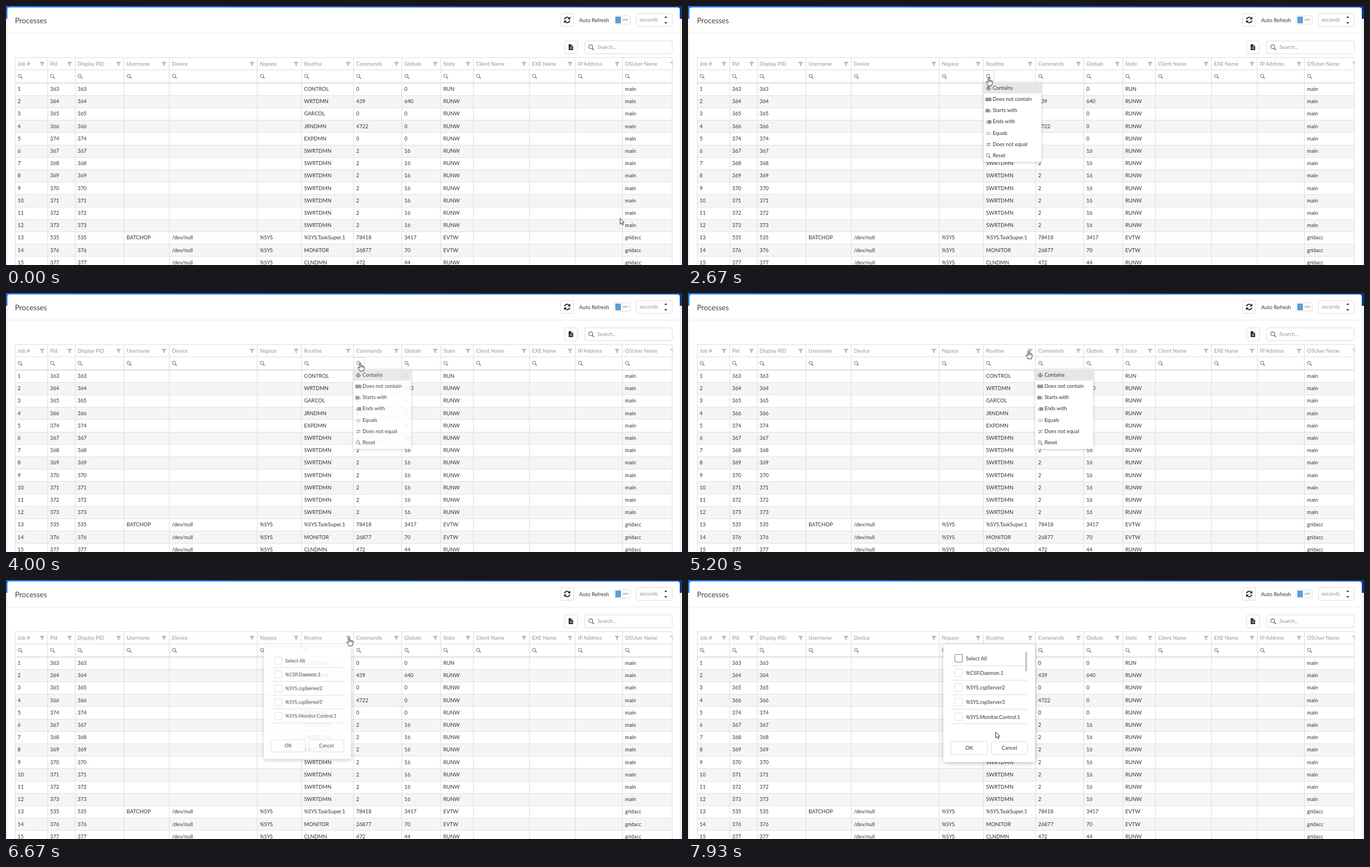
These frames come from a looping animation (1207 px wide and 464 px high, 8 s). An HTML page:

```html
<!DOCTYPE html>
<html lang="en">
<head>
<meta charset="utf-8">
<title>Processes</title>
<style>
  html, body { margin: 0; width: 100%; height: 100%; overflow: hidden; background: #fff; }
  svg { display: block; width: 1207px; height: 464px; }
  text { font: 9.333px Lato, sans-serif; fill: #333; white-space: pre; }
  .title { font-size: 13.2px; fill: #444; }
  .item { font-size: 9.2px; }
  .off { font-size: 5.4px; font-weight: 700; fill: #999; }
  .head { fill: #959595; }
  .mid { text-anchor: middle; }
  .line { stroke: #ddd; fill: none; }
  .box { stroke: #ddd; fill: #fff; }
  .menu { filter: drop-shadow(0 1px 2px rgba(0, 0, 0, .25)); }
  .popup { filter: drop-shadow(0 2px 4px rgba(0, 0, 0, .25)); transform-origin: 538px 220.5px; }

  .smooth { animation: 8s linear infinite; }
  .step { animation: 8s step-end infinite; }
  #menu1 { animation-name: menu1; }
  #menu2 { animation-name: menu2; }
  #hover1 { animation-name: hover1; }
  #hover2 { animation-name: hover2; }
  #popup { animation-name: pop; }
  #focus { animation-name: focus; }
  #bar { animation-name: bar; }
  #cursor { animation-name: move; }
  #arrow { animation-name: arrow; }
  #beam { animation-name: beam; }
  #hand { animation-name: hand; }

  @keyframes menu1 { 0%, 31.4% { opacity: 0 } 32.65%, 38.8% { opacity: 1 } 40.05%, 100% { opacity: 0 } }
  @keyframes menu2 { 0%, 48.9% { opacity: 0 } 50.15%, 66.6% { opacity: 1 } 67.85%, 100% { opacity: 0 } }
  @keyframes hover1 { 0% { opacity: 0 } 29.2% { opacity: 1 } 35.6%, 100% { opacity: 0 } }
  @keyframes hover2 { 0% { opacity: 0 } 47.2% { opacity: 1 } 60.8%, 100% { opacity: 0 } }
  @keyframes pop {
    0% { opacity: 0; transform: scale(.55) }
    81.12% { opacity: 0; transform: scale(.55); animation-timing-function: cubic-bezier(.25, .1, .25, 1) }
    84.87%, 100% { opacity: 1; transform: none }
  }
  @keyframes focus { 0% { opacity: 0 } 84.9%, 100% { opacity: 1 } }
  @keyframes bar { 0% { opacity: 0 } 89.5%, 100% { opacity: 1 } }

  @keyframes move {
    0%, .4% { transform: translate(1096px, 380px); animation-timing-function: ease-in-out }
    4.1%, 7.1% { transform: translate(670.5px, 130px) }
    11% { transform: translate(535px, 123px) }
    13.75% { transform: translate(515px, 110px) }
    15.6% { transform: translate(532px, 108px) }
    16.63% { transform: translate(550px, 107px) }
    17.5% { transform: translate(579px, 106px) }
    19% { transform: translate(616px, 104px) }
    21.6%, 22.6% { transform: translate(612px, 103px) }
    26.25% { transform: translate(580px, 113px) }
    29.4% { transform: translate(540px, 126px) }
    32%, 34.4% { transform: translate(537px, 128px) }
    37% { transform: translate(570px, 130px) }
    40% { transform: translate(658px, 130px) }
    45%, 46.2% { transform: translate(646px, 129px) }
    47.9%, 59.2% { transform: translate(633px, 125px) }
    61.3% { transform: translate(625px, 118px) }
    65% { transform: translate(608px, 103px) }
    68.7% { transform: translate(572px, 111px) }
    70%, 70.5% { transform: translate(575px, 124px) }
    73% { transform: translate(584px, 113px) }
    76.6%, 85.6% { transform: translate(613px, 103px) }
    88.8% { transform: translate(602px, 124px) }
    91.6%, 92% { transform: translate(583px, 146px) }
    94.5% { transform: translate(520px, 185px) }
    96.3% { transform: translate(481px, 225px) }
    99.1%, 100% { transform: translate(549px, 272px) }
  }
  @keyframes arrow { 0% { opacity: 1 } 3.6% { opacity: 0 } 98.5%, 100% { opacity: 1 } }
  @keyframes beam {
    0% { opacity: 0 } 3.6% { opacity: 1 } 10.7% { opacity: 0 }
    26.7% { opacity: 1 } 29% { opacity: 0 } 35.6% { opacity: 1 } 47.2% { opacity: 0 }
    69.2% { opacity: 1 } 72.5%, 100% { opacity: 0 }
  }
  @keyframes hand {
    0% { opacity: 0 } 10.7% { opacity: 1 } 26.7% { opacity: 0 } 29% { opacity: 1 }
    35.6% { opacity: 0 } 47.2% { opacity: 1 } 69.2% { opacity: 0 } 72.5% { opacity: 1 } 98.5%, 100% { opacity: 0 }
  }
</style>
</head>
<body>
<svg viewBox="0 0 1207 464">
  <defs>
    <linearGradient id="blue"><stop stop-color="#1a73e0"/><stop offset="1" stop-color="#0b3c8c"/></linearGradient>
    <clipPath id="grid"><rect x="15" y="92" width="1175.5" height="372"/></clipPath>
    <g id="funnel"><path d="M-4.5-4H4.5L1.3 0V4.2L-1.3 2.6V0Z" fill="#bbb"/></g>
    <g id="lens" fill="none" stroke="#707070">
      <circle cx="-.8" cy="-.8" r="2.9"/><path d="M1.4 1.4L4 4" stroke-width="1.4"/>
    </g>
  </defs>

  <rect width="1207" height="464" fill="#f1f1f1"/>
  <rect width="1207" height="23" fill="url(#blue)"/>
  <path d="M2.5 464V6.5a4 4 0 0 1 4-4H1199a4 4 0 0 1 4 4V464Z" fill="#fff"/>
  <path d="M3 48.5H1203" stroke="#e8e8e8"/>
  <text class="title" x="16" y="31">Processes</text>

  <rect class="box" x="990.5" y="13.5" width="23" height="23" rx="2.5"/>
  <g transform="translate(1002 25)" fill="none" stroke="#222" stroke-width="1.7">
    <path d="M-4.7-1A4.8 4.8 0 0 1 3.6-3.2M4.7 1A4.8 4.8 0 0 1-3.6 3.2"/>
    <path d="M5.6-5.8V-.9H.7ZM-5.6 5.8V.9H-.7Z" fill="#222" stroke="none"/>
  </g>
  <text x="1023.3" y="28.7">Auto Refresh</text>
  <rect class="box" x="1086.5" y="17.5" width="28" height="15" rx="2"/>
  <rect x="1088" y="19" width="10" height="12" rx="1" fill="#5c9fd6"/>
  <text class="off" x="1100.6" y="27.2">OFF</text>
  <rect class="box" x="1125.5" y="13.5" width="64" height="23" rx="2.5"/>
  <text class="head" x="1131" y="28.3">seconds</text>
  <path d="M1175.3 21.3H1180.7L1178 18.2ZM1175.3 29H1180.7L1178 32.1Z" fill="#333"/>

  <rect class="box" x="997.5" y="62.5" width="23" height="23" rx="2.5"/>
  <path d="M1004.7 68.5H1009.6L1012.5 71.4V79H1004.7Z" fill="#222"/>
  <path d="M1009.6 68.5V71.4H1012.5M1007 73.2L1010.4 77.4M1010.4 73.2L1007 77.4" stroke="#fff" fill="none"/>
  <rect class="box" x="1033.5" y="62.5" width="156" height="23" rx="2.5"/>
  <use href="#lens" transform="translate(1045 74) scale(1.2)"/>
  <text class="head" x="1056" y="77.3">Search...</text>

  <g id="table" clip-path="url(#grid)"></g>
  <rect id="hover1" class="step line" x="527.5" y="115.5" width="19" height="21"/>
  <rect id="hover2" class="step line" x="620.5" y="115.5" width="19" height="21"/>
  <g id="menu1" class="smooth menu"></g>
  <g id="menu2" class="smooth menu"></g>
  <g id="popup" class="smooth popup">
    <rect x="456" y="115" width="164" height="211" rx="4" fill="#fff"/>
    <g id="list"></g>
    <rect id="focus" class="step" x="476.5" y="133.5" width="13.5" height="13.5" rx="1" fill="none" stroke="#4f93c9"/>
    <rect id="bar" class="step" x="602.3" y="129" width="3" height="34.5" rx="1" fill="#bfbfbf"/>
    <rect class="box" x="469.5" y="289.5" width="65" height="23" rx="2.5"/>
    <rect class="box" x="541.5" y="289.5" width="65" height="23" rx="2.5"/>
    <text class="mid" x="502" y="304.3">OK</text>
    <text class="mid" x="573.7" y="304.3">Cancel</text>
  </g>

  <g id="cursor" class="smooth">
    <g id="arrow" class="step"><path d="M.5.5V11L3 8.7 4.6 12.3 6.3 11.5 4.7 8H8Z" fill="#fff" stroke="#222" stroke-width=".9"/></g>
    <g id="beam" class="step"><path d="M-2.3-7.5H-.6L0-7 .6-7.5H2.3M0-7V7M-2.3 7.5H-.6L0 7 .6 7.5H2.3" fill="none" stroke="#222"/></g>
    <g id="hand" class="step">
      <path d="M-1.3 9.6V1.4Q-1.2.4-.2.4T.9 1.4V5.4Q2 4.6 2.8 5.6 4.3 4.8 4.7 6.2 6.6 5.6 6.6 7.4V10.8L5.3 13V15H-1.2V13.4L-4.6 9.4Q-5 7.7-3.2 7.8Z" fill="#fff" stroke="#222" stroke-width=".9" stroke-linejoin="round"/>
      <path d="M.9 5.4V8.4M2.8 5.8V8.6M4.7 6.4V8.8" stroke="#222" stroke-width=".7"/>
    </g>
  </g>
</svg>
<script>
  const $ = id => document.getElementById(id);
  const text = (x, y, s, cls = '') => `<text class="${cls}" x="${x}" y="${y}">${s}</text>`;
  const use = (id, x, y) => `<use href="#${id}" x="${x}" y="${y}"/>`;
  const rule = d => `<path class="line" d="${d}"/>`;

  const edges = [16, 74, 123, 210.5, 291.5, 448.5, 527.5, 620.5, 706.5, 776, 834.5, 934.5, 1016.5, 1100.5, 1200];
  const heads = ['Job #', 'Pid', 'Display PID', 'Username', 'Device', 'Nspace', 'Routine', 'Commands',
    'Globals', 'State', 'Client Name', 'EXE Name', 'IP Address', 'OSUser Name'];
  const [top0, pitch] = [137.5, 22.2];

  // pid, routine, commands, globals, state, user, device, namespace
  const rows = [
    '363,CONTROL,0,0,RUN', '364,WRTDMN,439,640,RUNW', '365,GARCOL,0,0,RUNW',
    '366,JRNDMN,4722,0,RUNW', '374,EXPDMN,0,0,RUNW',
    ...Array.from({ length: 7 }, (_, i) => `${367 + i},SWRTDMN,2,16,RUNW`),
    '535,%SYS.TaskSuper.1,78418,3417,EVTW,BATCHOP,/dev/null,%SYS',
    '376,MONITOR,26877,70,EVTW,,/dev/null,%SYS',
    '377,CLNDMN,472,44,RUNW,,/dev/null,%SYS'
  ].map(r => r.split(','));

  function drawTable() {
    let out = '';
    rows.forEach(([pid, routine, cmds, globals, state, user = '', dev = '', ns = ''], i) => {
      const y = top0 + i * pitch;
      const owner = dev ? 'gridacc' : 'main';
      const cells = [i + 1, pid, pid, user, dev, ns, routine, cmds, globals, state, '', '', '', owner];
      if (i % 2) out += `<rect x="16" y="${y}" width="1174" height="${pitch}" fill="#f5f5f5"/>`;
      out += `<path d="M16 ${Math.round(y) + .5}H1190" stroke="#e2e2e2"/>`;
      cells.forEach((c, k) => { if (c !== '') out += text(edges[k] + 4.8, y + 14.4, c); });
    });
    heads.forEach((h, k) => {
      const x = edges[k];
      out += text(x + 4.8, 107.3, h, 'head') + use('funnel', edges[k + 1] - 9.5, 104)
        + use('lens', x + 9.2, 126) + rule(`M${Math.floor(x) + .5} 92V464`);
    });
    return out + rule('M16 92.5H1190M16 114.5H1190M16 137.5H1190M1189.5 92V464');
  }

  const options = ['Contains', 'Does not contain', 'Starts with', 'Ends with', 'Equals', 'Does not equal', 'Reset'];
  const block = (x, w) => `M${x}-3h${w}v6h${-w}Z`;
  const glyphs = [
    block(2, 5) + 'M0-1h1.4v3H0ZM7.6-1H9v3H7.6ZM3.5-4h2v8h-2Z',
    block(-.8, 10.4),
    block(-.5, 7) + 'M7.2-1H9.2V0H7.2ZM7.2 1.4H9.2v1H7.2Z',
    block(2.6, 7) + 'M0-1H2V0H0ZM0 1.4H2v1H0Z',
    'M.5-2H8.5v.9H.5ZM.5 1.2H8.5v.9H.5Z',
    'M.5-2H8.5v.9H.5ZM.5 1.2H8.5v.9H.5ZM5.8-3.6L6.6-3.2 3.2 3.8 2.4 3.4Z'
  ];

  function drawMenu(x) {
    let out = `<rect x="${x}" y="136" width="103.5" height="143.5" fill="#fff"/>`
      + `<rect x="${x}" y="136.5" width="103.5" height="20.2" fill="#e6e6e6"/>`;
    options.forEach((o, i) => {
      const y = 146.6 + i * 20.18;
      out += text(x + 16.4, y + 3.2, o);
      out += glyphs[i]
        ? `<path transform="translate(${x + 4.5} ${y + .6})" fill="#888" d="${glyphs[i]}"/>`
        : use('lens', x + 9, y + .5);
      // tiny letter strokes inside the block glyphs
      if (i < 4) out += `<path d="M${x + 7} ${y + .7}h5" stroke="#ccc" stroke-width="1.4" stroke-dasharray="1 .8"/>`;
    });
    return out;
  }

  const routines = ['Select All', '%CSP.Daemon.1', '%SYS.cspServer2', '%SYS.cspServer3', '%SYS.Monitor.Control.1'];

  function drawList() {
    return routines.map((r, i) => {
      const y = 140.5 + i * 26.15;
      return `<rect class="box" x="476.5" y="${y - 7}" width="13.5" height="13.5" rx="1"/>`
        + text(496.3, y + 3.4, r, 'item') + rule(`M469.5 ${Math.round(y + 13) - .5}H606.5`);
    }).join('');
  }

  $('table').innerHTML = drawTable();
  $('menu1').innerHTML = drawMenu(527.5);
  $('menu2').innerHTML = drawMenu(620);
  $('list').innerHTML = drawList();
</script>
</body>
</html>
```
